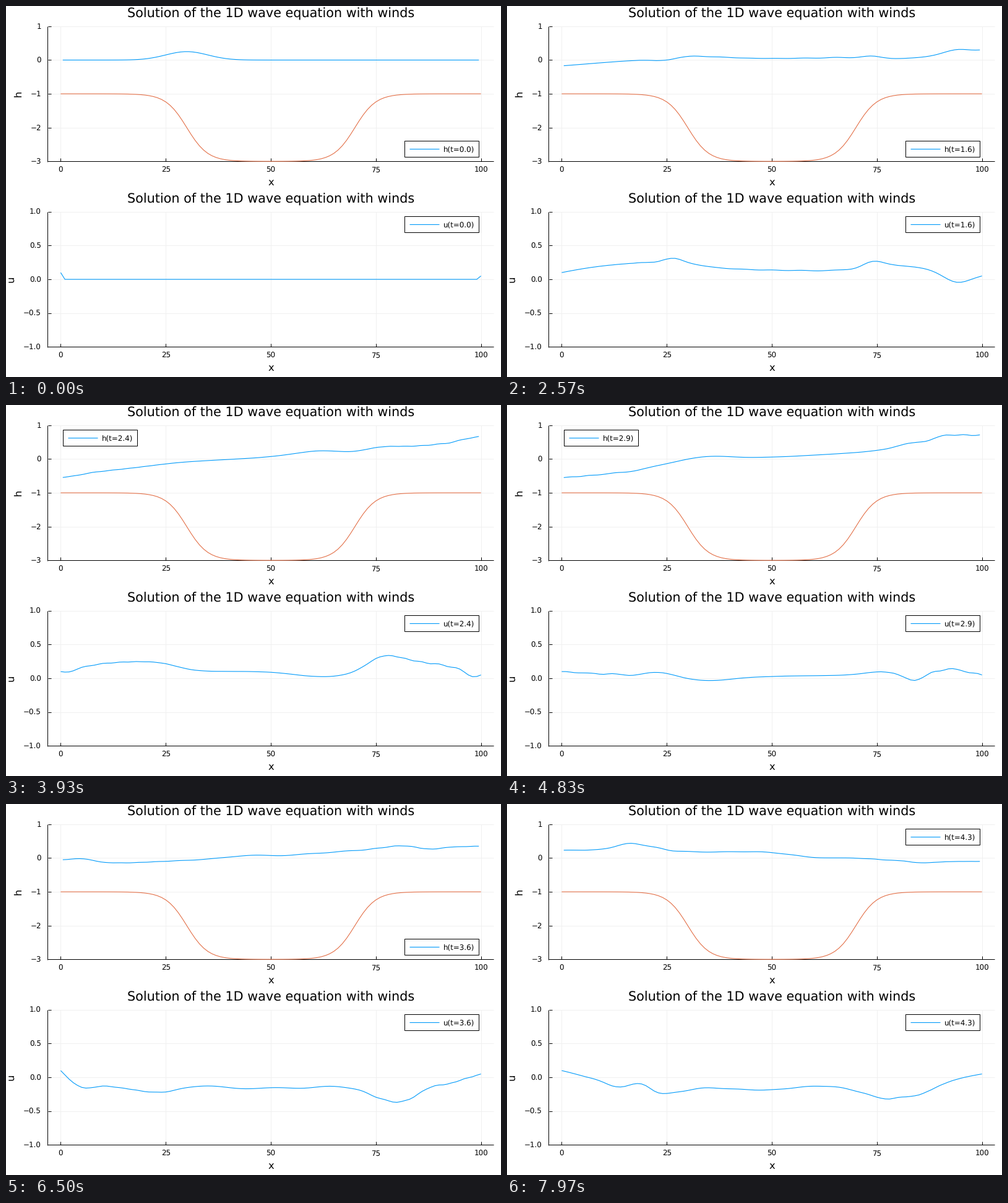
These frames come from a looping animation (800x600 px, 8000 ms). A matplotlib script:

```python
import numpy as np
import matplotlib.pyplot as plt
from matplotlib.animation import FuncAnimation
from matplotlib.patches import Rectangle

W, H = 800, 600
FRAMES = 240
PX = 0.72  # points per pixel at 100 dpi
BLUE, ORANGE = "#009AFA", "#E36F47"
TITLE = "Solution of the 1D wave equation with winds"
HOUR = 36.0  # model time units per hour

plt.rcParams["font.family"] = "DejaVu Sans"
plt.rcParams["text.hinting"] = "none"

# ---- model: staggered grid, h in cell centres, u on cell faces ----
N = 100
DT = 0.55
xu = np.arange(N + 1.0)
xh = xu[:-1] + 0.5
depth = 1 + np.tanh((xu - 30) / 5) - np.tanh((xu - 70) / 5)


def wind(t):
    """Gusts that rise and fade every four hours."""
    return 0.01 * np.sin(np.pi * t / (4 * HOUR)) ** 2


def rates(t, h, u):
    dh = -np.diff(depth * u)
    du = np.zeros_like(u)
    du[1:-1] = -np.diff(h) + wind(t) / depth[1:-1]
    return dh, du


def rk4(t, h, u):
    a = rates(t, h, u)
    b = rates(t + DT / 2, h + DT / 2 * a[0], u + DT / 2 * a[1])
    c = rates(t + DT / 2, h + DT / 2 * b[0], u + DT / 2 * b[1])
    d = rates(t + DT, h + DT * c[0], u + DT * c[1])
    return [s + DT / 6 * (p + 2 * q + 2 * r + w)
            for s, p, q, r, w in zip((h, u), a, b, c, d)]


def solve(t_end):
    h = 0.25 * np.exp(-(xh - 30) ** 2 / 50)
    u = np.zeros(N + 1)
    u[0], u[-1] = 0.1, 0.05
    states = [(h, u)]
    for n in range(int(t_end / DT) + 2):
        h, u = rk4(n * DT, h, u)
        states.append((h, u))
    return states


# the step size of the run varies, so time is not quite linear in frames
times = np.interp(np.arange(FRAMES),
                  [0, 43, 77, 118, 150, 173, 217, 239],
                  [0, 30.3, 59, 88, 106, 117.5, 143, 153.1])
states = solve(times[-1])


def state_at(t):
    n = int(t / DT)
    k = t / DT - n
    return [(1 - k) * a + k * b for a, b in zip(states[n], states[n + 1])]


# ---- drawing, in pixel coordinates ----
fig = plt.figure(figsize=(W / 100, H / 100), dpi=100, facecolor="white")
ax = fig.add_axes([0, 0, 1, 1])
ax.set_xlim(0, W)
ax.set_ylim(H, 0)
ax.axis("off")

LEFT, RIGHT = 68.0, 788.0
MID = (LEFT + RIGHT) / 2
SPAN = (RIGHT - LEFT) / 106


def px(x):
    return LEFT + (np.asarray(x) + 3) * SPAN


def line(x, y, color="black", width=1.0, z=2):
    return ax.plot(x, y, color=color, lw=width * PX, zorder=z,
                   solid_capstyle="butt")[0]


def text(x, y, s, size, ha="center", va="baseline", **kw):
    return ax.text(x, y, s, fontsize=size * PX, ha=ha, va=va, **kw)


class Panel:
    def __init__(self, top, lo, hi, ticks, labels, name, name_x):
        self.top, self.lo, self.hi = top, lo, hi
        base = self.base = top + 218.5
        for x in (0, 25, 50, 75, 100):
            p = px(x)
            line([p, p], [top, base], "#f0f0f0", 1, 1)
            line([p, p], [base, base - 5])
            text(p, base + 17.6, str(x), 11.9)
        for v, s in zip(ticks, labels):
            p = self.py(v)
            line([LEFT, RIGHT], [p, p], "#f0f0f0", 1, 1)
            line([LEFT, LEFT + 5], [p, p])
            text(57, p + 4.4, s, 11.9, ha="right")
        line([LEFT - 0.6, LEFT - 0.6], [top, base + 0.5])
        line([LEFT - 0.6, RIGHT], [base, base])
        text(MID, top - 14.6, TITLE, 20.8)
        text(MID, base + 38.8, "x", 16.35)
        text(name_x, top + 109.3, name, 16.35, rotation=90,
             rotation_mode="anchor")
        self.curve = line([], [], BLUE, 1.1, 3)
        self.box = Rectangle((0, 0), 120, 26, fc="white", ec="black",
                             lw=PX, zorder=4)
        ax.add_patch(self.box)
        self.key = line([], [], BLUE, 1.1, 5)
        self.label = text(0, 0, "", 11.9, ha="left", zorder=5)

    def py(self, v):
        return self.base - (np.asarray(v) - self.lo) / (self.hi - self.lo) * 218.5

    def legend(self, x, y, s):
        self.box.set_xy((x, y))
        self.key.set_data([x + 8, x + 56], [y + 13, y + 13])
        self.label.set_position((x + 63, y + 17.3))
        self.label.set_text(s)

    def draw(self, x, v):
        self.curve.set_data(px(x), self.py(v))


upper = Panel(32.8, -3, 1, range(-3, 2), ["−3", "−2", "−1", "0", "1"],
              "h", 24.8)
lower = Panel(332.8, -1, 1, [-1, -0.5, 0, 0.5, 1],
              ["−1.0", "−0.5", "0.0", "0.5", "1.0"], "u", 13.6)
line(px(xu), upper.py(-depth), ORANGE, 1.1, 3)


def legend_spot(h):
    """Prefer a top corner that the surface stays clear of."""
    if h[xh > 76].max() < -0.02:
        return 644.2, 40.3
    if h[xh < 24].max() < -0.02:
        return 92.2, 40.3
    return 644.2, 218.3


def update(i):
    t = times[i]
    h, u = state_at(t)
    upper.draw(xh, h)
    lower.draw(xu, u)
    stamp = f"(t={t / HOUR:.1f})"
    upper.legend(*legend_spot(h), "h" + stamp)
    lower.legend(644.2, 340.3, "u" + stamp)
    return []


anim = FuncAnimation(fig, update, frames=FRAMES, interval=8000 / FRAMES,
                     init_func=lambda: update(0), repeat=True, repeat_delay=0)
plt.show()
```
